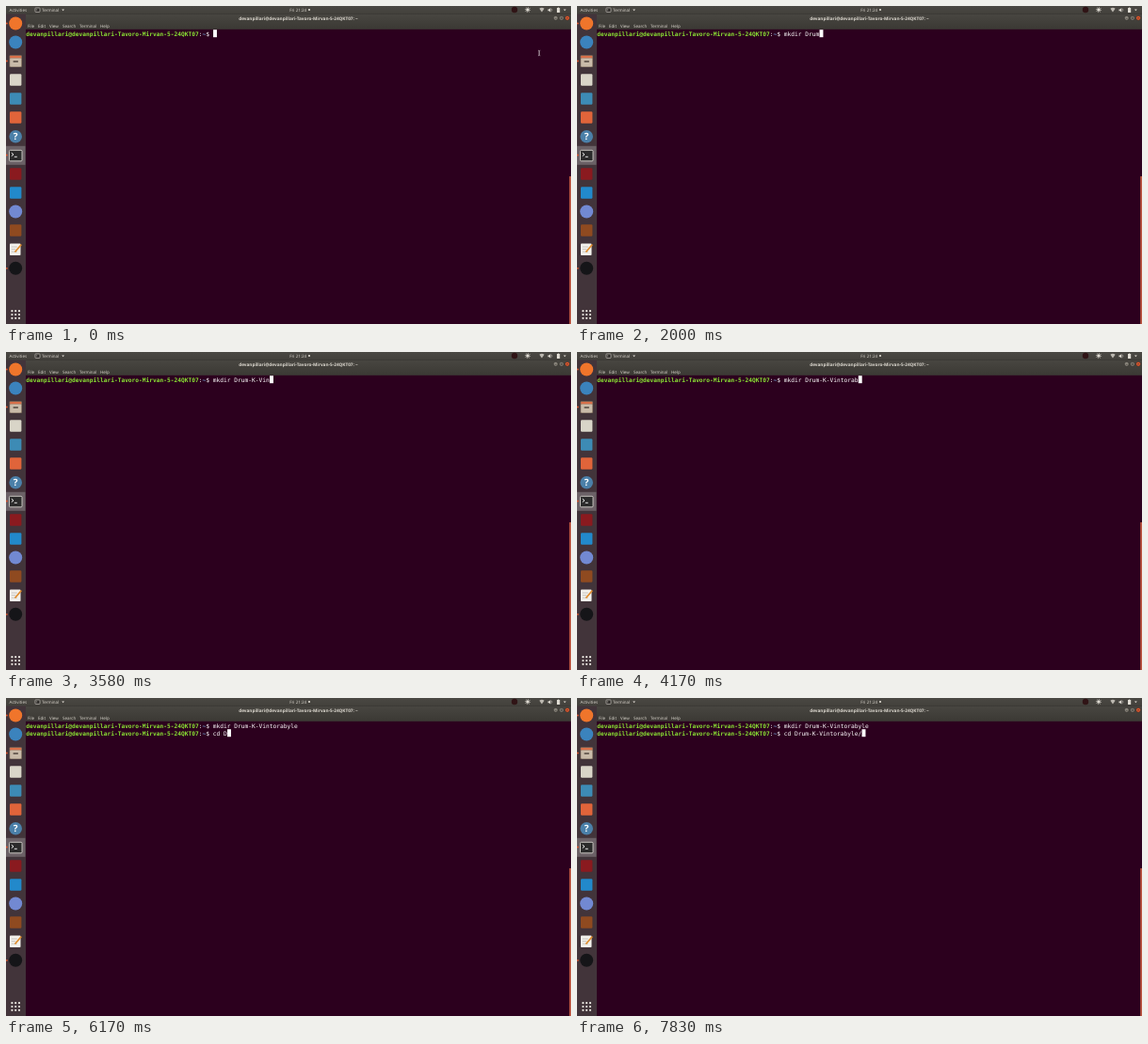
Recreate the animation shown at these times as an HTML page. Size 600 by 338 pixels, loop 8 s.

```html
<!DOCTYPE html>
<html lang="en">
<head>
<meta charset="utf-8">
<title>Terminal session</title>
<style>
  html, body { margin: 0; width: 100%; height: 100%; overflow: hidden; background: #2c001e; }
  svg { display: block; width: 600px; height: 338px; }
  text { font: 4.5px "Open Sans", "Noto Sans", sans-serif; fill: #dfdbd2; text-rendering: geometricPrecision; white-space: pre; }
  .bold { font-size: 4.72px; font-weight: 700; }
  .shell { font: 6.229px "DejaVu Sans Mono", monospace; fill: #fff; }
  .host { font-weight: 700; fill: #8ae234; }
  .path { font-weight: 700; fill: #729fcf; }
</style>
</head>
<body>
<svg viewBox="0 0 600 338">
  <defs>
    <linearGradient id="panel" x2="0" y2="1"><stop stop-color="#4a4843"/><stop offset="1" stop-color="#42403b"/></linearGradient>
    <linearGradient id="frame" x2="0" y2="1"><stop stop-color="#484641"/><stop offset="1" stop-color="#3b3934"/></linearGradient>
  </defs>
  <rect x="598.2" y="181" width="1.8" height="157" fill="#bb5541"/>

  <!-- top panel -->
  <rect width="600" height="9" fill="url(#panel)"/>
  <text x="3.6" y="5.8">Activities</text>
  <rect x="31" y="2" width="5" height="4.4" rx=".6" fill="#2b2927" stroke="#c9c5bd" stroke-width=".7"/>
  <path d="M32.2 3.2l1 .9-1 .9" fill="none" stroke="#c9c5bd" stroke-width=".5"/>
  <text x="38" y="5.8">Terminal</text>
  <path d="M59.2 3.4h2.8l-1.4 1.8z" fill="#dfdbd2"/>
  <text x="301.2" y="5.8">Fri 21:24</text>
  <circle cx="322" cy="4" r="1.1" fill="#dfdbd2"/>
  <circle cx="540" cy="4" r="3.2" fill="#301416"/>
  <circle cx="554" cy="4" r="1.8" fill="#dfdbd2"/>
  <circle cx="554" cy="4" r="2.6" fill="none" stroke="#dfdbd2" stroke-width=".8" stroke-dasharray=".8 1.2"/>
  <path d="M566.4 2.8q2.6-2 5.2 0L569 6.6z" fill="#bdb9b1"/>
  <path d="M575.5 3.4h1.2l1.6-1.4v4.6l-1.6-1.4h-1.2z" fill="#dfdbd2"/>
  <path d="M579.3 2.8q1.2 1.4 0 2.8" fill="none" stroke="#dfdbd2" stroke-width=".5"/>
  <path d="M585 2h1v-.6h1.2V2h1v5H585z" fill="#dfdbd2"/>
  <path d="M592 3.4h2.8l-1.4 1.8z" fill="#dfdbd2"/>

  <!-- window frame -->
  <rect x="21" y="8.6" width="579" height="16.2" fill="url(#frame)"/>
  <rect x="21" y="8.3" width="579" height=".5" fill="#34322e"/>
  <text id="title" class="bold" x="310.5" y="14.7" text-anchor="middle"></text>
  <g stroke="#2e2c29" stroke-width=".5">
    <circle cx="583.7" cy="12.8" r="2.4" fill="#8b877d"/>
    <circle cx="589.9" cy="12.8" r="2.4" fill="#8b877d"/>
    <circle cx="596.1" cy="12.8" r="2.4" fill="#e8592e"/>
  </g>
  <path d="M582.7 13.3h2M589.1 12h1.6v1.6h-1.6zM595.4 12.1l1.4 1.4m0-1.4l-1.4 1.4" fill="none" stroke="#2e2c29" stroke-width=".5"/>
  <g id="menu"></g>

  <!-- dock -->
  <rect y="8.5" width="21" height="329.5" fill="#42343a"/>
  <rect y="148.8" width="20.5" height="20" fill="#6b6166"/>
  <g id="dock"></g>
  <g>
    <rect x="3.5" y="52.3" width="13.5" height="12.8" rx="1.2" fill="#7d6b5c"/>
    <rect x="4.2" y="52.9" width="12" height="2.6" fill="#d9714a"/>
    <rect x="4.2" y="55.4" width="12" height="9" rx=".8" fill="#c9bba9"/>
    <rect x="7.5" y="58" width="5.5" height="2" rx=".7" fill="#6e6258"/>
  </g>
  <circle cx="10.2" cy="138.7" r="6.8" fill="#4b80a9"/>
  <text x="10.2" y="142.3" text-anchor="middle" style="font-size:10px;font-weight:700;fill:#fff">?</text>
  <rect x="3.5" y="153.3" width="13.5" height="11.5" rx="1" fill="#2b2b2b" stroke="#d5d2cc" stroke-width=".9"/>
  <path d="M5.8 156.1l2.2 1.7-2.2 1.7M8.8 160.3h3" fill="none" stroke="#fff" stroke-width=".9"/>
  <rect x="4" y="252.5" width="11.5" height="12.5" rx=".8" fill="#f3f1ec"/>
  <path d="M5.8 256h6M5.8 258.6h4.5M5.8 261.2h6" stroke="#aaa69f" stroke-width=".6"/>
  <path d="M9.5 261.5l6.8-8" stroke="#e08b2c" stroke-width="1.7"/>
  <g id="apps" fill="#eeeae4"></g>
  <g id="running" fill="#e8592e"></g>

  <!-- shell -->
  <text id="row0" class="shell" x="21.3" y="31.7"></text>
  <text id="row1" class="shell" x="21.3" y="39.7"></text>
  <rect id="cursor" width="3.9" height="8" fill="#fff"/>
  <path id="pointer" d="M565 47.2q1.2 0 1.2.8v4q0 .8-1.2.8m2.4-5.6q-1.2 0-1.2.8v4q0 .8 1.2.8" fill="none" stroke="#c9c0c6" stroke-width=".6"/>
</svg>
<script>
const LOOP = 8000, LEFT = 21.3, TOP = 25.2, CELL = 3.75, LINE = 8;
const HOST = "devanpillari@devanpillari-Tavoro-Mirvan-5-24QKT07";
const FOLDER = "Drum-K-Vintorabyle";
const PROMPT_LENGTH = HOST.length + 4;
const FIRST_KEY = 170, ENTER = 4920, COMPLETE = 7830;

// Each key time reveals one more character of the command.
const commands = [
  { text: "mkdir " + FOLDER, start: 0,
    keys: [FIRST_KEY, 330, 420, 500, 750, 1000, 1330, 1670, 1830, 2000, 2250, 2580, 2830,
           3420, 3500, 3580, 3670, 3830, 4000, 4080, 4170, 4420, 4500, 4670] },
  { text: "cd " + FOLDER + "/", start: ENTER, complete: COMPLETE,
    keys: [5330, 5500, 5670, 6000, 6250, 6420, 6580, 7000, 7330, 7500, 7750] }
];

const $ = id => document.getElementById(id);

$("title").textContent = HOST + ": ~";
$("menu").innerHTML = [["File", 23], ["Edit", 34], ["View", 46], ["Search", 60], ["Terminal", 78], ["Help", 100]]
  .map(([label, x]) => `<text x="${x}" y="22.8">${label}</text>`).join("");

const disc = (y, color) => `<circle cx="10.2" cy="${y}" r="7" fill="${color}"/>`;
const tile = (y, color) => `<rect x="4" y="${y - 6.2}" width="12.4" height="12.4" rx="1.2" fill="${color}"/>`;
$("dock").innerHTML = [
  disc(18.5, "#f0752b"), disc(38.5, "#3b83bd"), tile(78.5, "#d9d5c8"), tile(98.5, "#3d8bb5"),
  tile(118.5, "#e0643a"), tile(178.5, "#8a1a1f"), tile(198.5, "#2289cb"), disc(218.5, "#7289d2"),
  tile(238.5, "#8f4a20"), disc(278.8, "#151518")
].join("");

for (let i = 0; i < 9; i++)
  $("apps").innerHTML += `<circle cx="${6.4 + i % 3 * 3.8}" cy="${324.2 + Math.floor(i / 3) * 3.8}" r="1.1"/>`;
$("running").innerHTML = [18.5, 58.5, 158.5, 278.8]
  .map(y => `<circle cx=".9" cy="${y}" r=".9"/>`).join("");

const rows = commands.map((_, i) => {
  $("row" + i).innerHTML = `<tspan class="host">${HOST}</tspan>:<tspan class="path">~</tspan>$ <tspan></tspan>`;
  return { line: $("row" + i), input: $("row" + i).lastChild };
});

function draw(now) {
  const t = now % LOOP;
  commands.forEach(({ text, start, keys, complete }, i) => {
    const shown = t >= start;
    const length = t >= complete ? text.length : keys.filter(k => k <= t).length;
    rows[i].line.setAttribute("visibility", shown ? "visible" : "hidden");
    rows[i].input.textContent = text.slice(0, length);
    if (shown) {
      $("cursor").setAttribute("x", LEFT + (PROMPT_LENGTH + length) * CELL);
      $("cursor").setAttribute("y", TOP + i * LINE);
    }
  });
  $("pointer").setAttribute("visibility", t < FIRST_KEY ? "visible" : "hidden");
  requestAnimationFrame(draw);
}
draw(0);
</script>
</body>
</html>
```
